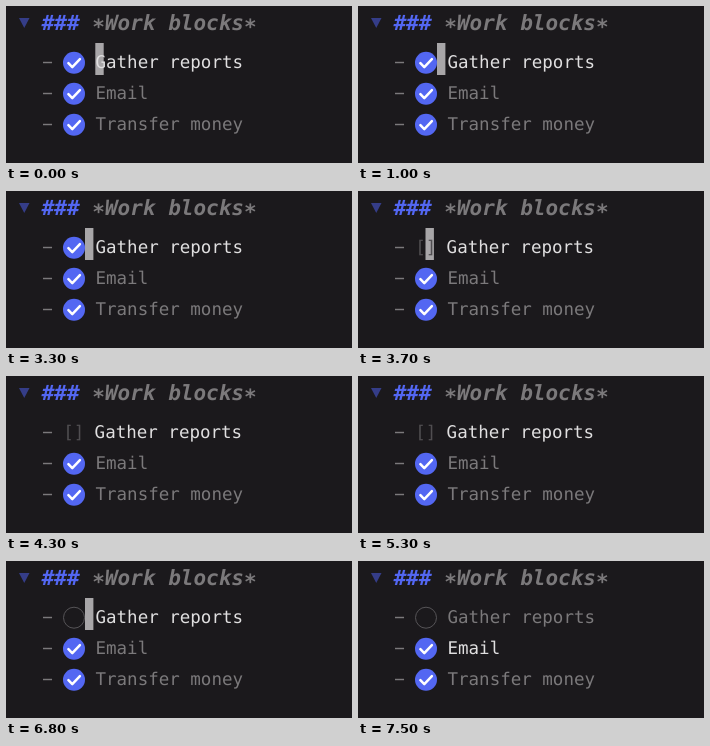
Write an HTML page that moves like this. It is 346 px wide and 157 px high and loops after 8 s.

```html
<!DOCTYPE html>
<html lang="en">
<head>
<meta charset="utf-8">
<title>Work blocks</title>
<style>
  html, body { margin: 0; height: 100%; overflow: hidden; background: #1b191c; }
  svg { display: block; width: 346px; height: 157px; }
  text {
    font: 17.5px "DejaVu Sans Mono", monospace;
    text-rendering: geometricPrecision;
    white-space: pre;
    fill: #7b797b;
  }
  .heading { font: italic bold 21px "DejaVu Sans Mono", monospace; }
  .hash { fill: #5367f2; }
  .active { fill: #e0dfe0; }
  .brackets { fill: #504e51; }
  .done { fill: #5367f2; }
  .tick { fill: none; stroke: #fff; stroke-width: 2.5; stroke-linecap: round; stroke-linejoin: round; }
  .open { fill: none; stroke: #565457; stroke-width: 1; }
</style>
</head>
<body>
<svg viewBox="0 0 346 157">
  <rect id="cursor" width="8.4" height="32" fill="#a8a6a8"/>
  <path d="M13 12h10.5l-5.25 10z" fill="#353d88"/>
  <text class="heading" x="35.7" y="24"><tspan class="hash">###</tspan> <tspan dy="4">*</tspan><tspan dy="-4">Work blocks</tspan><tspan dy="4">*</tspan></text>
  <g id="list"></g>
</svg>
<script>
const LOOP = 8000;
const ROW_HEIGHT = 31;
const tasks = ["Gather reports", "Email", "Transfer money"];

// [start, cursor x or null when blinked off, active row, first box]
const steps = [
  [0, 89.3, 0, "done"],
  [400, null, 0, "done"],
  [900, 89.3, 0, "done"],
  [1000, 79, 0, "done"],
  [1600, null, 0, "done"],
  [2100, 79, 0, "done"],
  [2700, null, 0, "done"],
  [3300, 79, 0, "done"],
  [3700, 67.5, 0, "brackets"],
  [4300, null, 0, "brackets"],
  [4800, 67.5, 0, "brackets"],
  [5300, null, 0, "brackets"],
  [5700, 79, 0, "open"],
  [6200, null, 0, "open"],
  [6800, 79, 0, "open"],
  [6900, 79, 1, "open"],
  [7500, null, 1, "open"],
];

const boxes = {
  done: '<circle class="done" cx="68" cy="56.7" r="11"/><path class="tick" d="M62.4 57.2l3.9 4 7.6-8"/>',
  open: '<circle class="open" cx="68" cy="56.7" r="10.5"/>',
  brackets: '<text class="brackets" x="57.2" y="62">[]</text>',
};

const cursor = document.getElementById("cursor");
const list = document.getElementById("list");

function row(label, i, active, box) {
  const x = box === "brackets" ? 88.6 : 89.5;
  return `<g transform="translate(0 ${i * ROW_HEIGHT})">
    <text x="36.2" y="62">−</text>${boxes[box]}
    <text x="${x}" y="62" class="${i === active ? "active" : ""}">${label}</text></g>`;
}

let shown;
function draw(now) {
  const time = now % LOOP;
  const step = steps.findLast(([start]) => start <= time);
  if (step !== shown) {
    shown = step;
    const [, x, active, firstBox] = step;
    cursor.setAttribute("visibility", x === null ? "hidden" : "visible");
    cursor.setAttribute("x", x ?? 0);
    cursor.setAttribute("y", 37 + active * ROW_HEIGHT);
    list.innerHTML = tasks.map((label, i) => row(label, i, active, i ? "done" : firstBox)).join("");
  }
  requestAnimationFrame(draw);
}
draw(performance.now());
</script>
</body>
</html>
```
